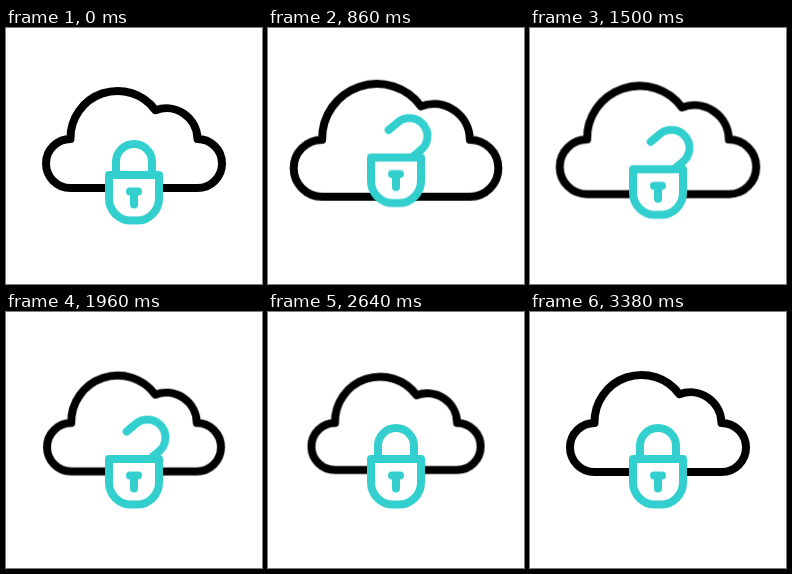
An HTML page for the animation above (3600 ms loop, 256x256 px).

```html
<!DOCTYPE html>
<html lang="en">
<head>
<meta charset="utf-8">
<title>Cloud lock</title>
<style>
  html, body { margin: 0; width: 100%; height: 100%; overflow: hidden; background: #fff; }
  svg { display: block; width: 100vw; height: 100vh; }
  path { fill: none; stroke-width: 8; stroke-linecap: round; stroke-linejoin: round; }
  .cloud { stroke: #000; vector-effect: non-scaling-stroke; transform-origin: 128px 107px; }
  .lock path { stroke: #33cfcf; }
  .lock .body { fill: #fff; }
  .shackle { transform-origin: 143.7px 144.2px; }
  .cloud, .lock, .shackle {
    animation: breathe 3600ms cubic-bezier(.37, 0, .63, 1) infinite;
  }
  .lock { animation-name: hop; }
  .shackle { animation-name: unlock; }

  @keyframes breathe {
    0% { transform: scale(1); }
    6.94% { transform: scale(1); animation-timing-function: cubic-bezier(.33, .15, .6, 1); }
    27.5%, 30.97% { transform: scale(1.172); }
    62.36%, 68.89% { transform: scale(.957); }
    90%, 100% { transform: scale(1); }
  }
  @keyframes hop {
    0%, 7.22% { transform: translateY(0); }
    23.61% { transform: translateY(-17.5px); }
    53.2%, 100% { transform: translateY(0); }
  }
  @keyframes unlock {
    0%, 9.44% { transform: rotate(0deg); }
    23.89%, 55% { transform: rotate(50deg); }
    71.67%, 100% { transform: rotate(0deg); }
  }
</style>
</head>
<body>
<svg viewBox="0 0 256 256">
  <path class="cloud" d="M64.5 160A24.5 24.5 0 0 1 64.5 111A47 47 0 0 1 149.5 82.3A31 31 0 0 1 191.5 111A24.5 24.5 0 0 1 191.5 160Z"/>
  <g class="lock">
    <path class="shackle" d="M110 146V134A18 18 0 0 1 146 134V146"/>
    <path class="body" d="M103 147H153V170.5A22 22 0 0 1 131 192.5H125A22 22 0 0 1 103 170.5Z"/>
    <path class="key" d="M124 163.5H132M128 163.5V176.5"/>
  </g>
</svg>
</body>
</html>
```
